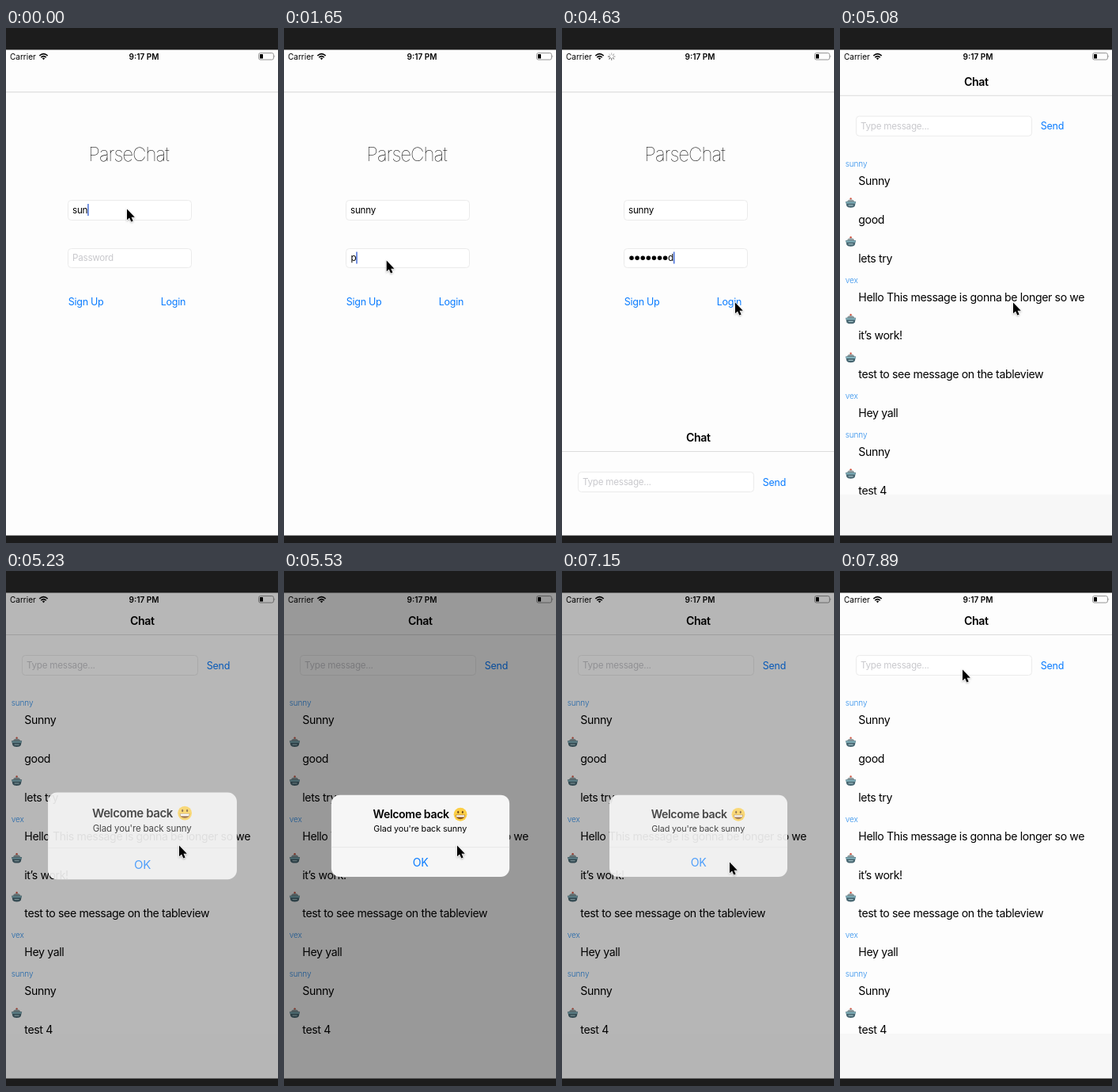
Recreate the animation shown at these times as an HTML page. Size 344 by 650 pixels, loop 8000 ms.

```html
<!DOCTYPE html>
<html lang="en">
<head>
<meta charset="utf-8">
<title>ParseChat login</title>
<style>
  html, body { margin: 0; width: 100%; height: 100%; overflow: hidden; background: #1c1c1c; }
  svg { display: block; width: 344px; height: 650px; }
  text { font-family: Inter, Roboto, sans-serif; font-size: 14.13px; letter-spacing: -.0265em; }
  .small { font-size: 11.63px; letter-spacing: -.02em; }
  .hint { fill: #c9c9cd; }
  .link { fill: #0a7cff; font-size: 12.5px; letter-spacing: -.02em; }
  .status { font-size: 10px; letter-spacing: 0; }
  .bold { font-weight: 600; }
  .user { fill: #2f8fec; font-size: 10px; font-weight: 300; letter-spacing: -.01em; }
  .field { fill: #fff; stroke: #ebebeb; }
  .mid { text-anchor: middle; }
</style>
</head>
<body>
<svg viewBox="0 0 344 650">
  <defs>
    <clipPath id="table"><rect y="154" width="344" height="430"/></clipPath>
    <g id="robot">
      <circle cy="-5.2" r="1.2" fill="#d0523f"/>
      <path d="M-4.5 -1Q-4.5 -4.2 0 -4.2T4.5 -1Z" fill="#8d9c9f"/>
      <path d="M-6.5 -1.5H6.5L5.2 4Q4 6.2 0 6.2T-5.2 4Z" fill="#466570"/>
      <path d="M-6.2 -1H6.2L5.8 1H-5.8Z" fill="#84b4be"/>
      <path d="M-3 3.3H3" stroke="#a8c6cb" stroke-width="1.2"/>
    </g>
  </defs>

  <rect y="27" width="344" height="614" fill="#fdfdfd"/>
  <path d="M0 80.8H344" stroke="#dedede" stroke-width="1.3"/>
  <text x="104.3" y="168" style="font-size:24px;font-weight:100;letter-spacing:-.04em">ParseChat</text>
  <rect class="field" x="78.5" y="217.5" width="156" height="25" rx="4"/>
  <rect class="field" x="78.5" y="278.5" width="156" height="24" rx="4"/>
  <text id="name" class="small" x="84" y="233.7"></text>
  <text id="hint" class="small hint" x="84" y="294.4">Password</text>
  <g id="dots"></g>
  <text id="letter" class="small" y="294.4"></text>
  <rect id="caret" width="1.4" height="15" fill="#3d66d6"/>
  <text class="link" x="78.7" y="349.5">Sign Up</text>
  <text id="login" class="link" x="195.7" y="349.5">Login</text>

  <g id="chat">
    <rect y="27" width="344" height="614" fill="#fdfdfd"/>
    <path d="M0 80.5H344" stroke="#dcdcdc"/>
    <text class="bold mid" x="172.3" y="68">Chat</text>
    <rect class="field" x="20.5" y="106.5" width="222" height="25" rx="4"/>
    <text class="small hint" x="26" y="123">Type message...</text>
    <text class="link" x="253.7" y="123.7">Send</text>
    <g id="rows">
      <rect id="footer" y="584" width="344" height="57" fill="#f7f7f7"/>
      <g id="list" clip-path="url(#table)"></g>
    </g>
  </g>

  <text class="status" x="5" y="39.7">Carrier</text>
  <g fill="none" stroke="#000" stroke-width="1.7">
    <path d="M42.3 35Q47.5 30.2 52.7 35M44.3 37.2Q47.5 34.2 50.7 37.2"/>
    <path d="M45.8 38.3Q47.5 36.9 49.2 38.3L47.5 40.2Z" fill="#000" stroke="none"/>
  </g>
  <g id="spinner" stroke="#444" stroke-width="1.1" stroke-linecap="round"></g>
  <text class="status bold mid" x="174.5" y="39.7">9:17 PM</text>
  <rect x="319.6" y="31.6" width="18.8" height="8.4" rx="2" fill="none" stroke="#888" stroke-width=".9"/>
  <rect x="321" y="33" width="4" height="5.6" rx=".6"/>
  <path d="M339.5 34.3Q341 35.8 339.5 37.3Z" fill="#888"/>

  <rect id="dim" y="27" width="344" height="614"/>
  <g id="alert">
    <rect id="panel" x="60" y="282.7" width="225" height="103.3" rx="11" fill="#f6f6f6"/>
    <g id="content">
      <path id="pressed" d="M60 349H285V375A11 11 0 0 1 274 386H71A11 11 0 0 1 60 375Z" fill="#dadada"/>
      <path d="M60 348.6H285" stroke="#e4e4e4" stroke-width=".8"/>
      <text class="bold" x="112.7" y="312.3">Welcome back</text>
      <circle cx="223" cy="307.3" r="8.4" fill="#fdcf45"/>
      <ellipse cx="220.2" cy="304.4" rx="1" ry="1.6" fill="#6b4415"/>
      <ellipse cx="225.8" cy="304.4" rx="1" ry="1.6" fill="#6b4415"/>
      <path d="M217 307.8H229Q228.4 313.2 223 313.2T217 307.8Z" fill="#8a5018"/>
      <path d="M217.5 308.2H228.5L227.8 310.6H218.2Z" fill="#fff"/>
      <text class="mid" x="172.2" y="329.2" style="font-size:10.8px;letter-spacing:-.01em">Glad you're back sunny</text>
      <text class="link mid" x="172.5" y="373.2" style="font-size:14.13px">OK</text>
    </g>
  </g>

  <path d="M0 0H344V27.5H0ZM0 640.5H344V650H0Z" fill="#1c1c1c"/>
  <path id="pointer" d="M0 0V13.8L3.1 11L5.3 16L7.7 15L5.5 10.2H9.8Z" stroke="#fff" stroke-width="1.2"
        paint-order="stroke" style="filter:drop-shadow(0 1px 1px #0004)"/>
</svg>

<script>
const LOOP = 8000, TICK = 148.85;   // the screen refreshes once per tick
const $ = id => document.getElementById(id);
const set = (id, attrs) => { for (const k in attrs) $(id).setAttribute(k, attrs[k]); };
const show = (id, on) => set(id, { visibility: on ? 'visible' : 'hidden' });

const robot = null, messages = [
  ['sunny', 'Sunny'], [robot, 'good'], [robot, 'lets try'],
  ['vex', 'Hello This message is gonna be longer so we'], [robot, 'it’s work!'],
  [robot, 'test to see message on the tableview'], ['vex', 'Hey yall'],
  ['sunny', 'Sunny'], [robot, 'test 4'],
];
$('list').innerHTML = messages.map(([user, text], i) => {
  const y = 167 + 48.85 * i;
  const from = user ? `<text class="user" x="6.7" y="${y + 3.3}">${user}</text>`
                    : `<use href="#robot" x="13.6" y="${y}"/>`;
  return `${from}<text x="23.3" y="${y + 26.2}">${text}</text>`;
}).join('');

$('spinner').innerHTML = Array.from({ length: 8 }, (_, i) =>
  `<path d="M0 -2.4V-4.3" transform="translate(62.7 36)rotate(${i * 45})" opacity="${.25 + i * .1}"/>`).join('');

const USER = 'sunny', PASSWORD = 'password';
const userKeys = [0, 0, 0, 1, 2], passKeys = [11, 12, 13, 15, 16, 19, 20, 22];
const typed = (keys, n) => keys.filter(k => k <= n).length;

// Critically damped spring from 0 to 1
const settle = x => {
  if (x <= 0) return 0;
  const v = 1 - (1 + x) * Math.exp(-x);
  return v > .995 ? 1 : v;
};

// Pointer moves: first tick, last tick, destination
const moves = [[3, 7, 129.7, 293.5], [22, 27, 219, 346.5], [39, 44, 212, 367.5], [48, 53, 155, 124.5]];
function pointerAt(n) {
  let x = 153, y = 228.5;
  for (const [a, b, toX, toY] of moves) {
    const u = Math.min(1, Math.max(0, (n - a) / (b - a))), e = u * u * (3 - 2 * u);
    x += (toX - x) * e;
    y += (toY - y) * e;
  }
  return [x, y];
}

function drawFields(n) {
  $('name').textContent = USER.slice(0, typed(userKeys, n));
  const count = typed(passKeys, n), hidden = Math.max(0, count - 1), x = 84.4 + 7.1 * hidden;
  show('hint', !count);
  $('dots').innerHTML = Array.from({ length: hidden }, (_, i) =>
    `<circle cx="${88 + 7.1 * i}" cy="290.2" r="2.75"/>`).join('');
  $('letter').textContent = count ? PASSWORD[hidden] : '';
  set('letter', { x });
  const inPassword = n >= 8;
  const end = inPassword ? x + $('letter').getComputedTextLength()
                         : 84 + $('name').getComputedTextLength();
  set('caret', { x: end, y: inPassword ? 282.5 : 222 });
}

function draw(n) {
  drawFields(n);
  set('login', { opacity: n === 28 ? .3 : 1 });
  show('spinner', n >= 29 && n < 34);
  set('spinner', { transform: `rotate(${n * 45} 62.7 36)` });

  set('chat', { transform: `translate(0 ${614 * (1 - settle((n - 30.5) * 1.98))})` });
  show('rows', n >= 33);

  const enter = settle((n - 34) * 2.4), alpha = enter * (1 - settle((n - 47.4) * 1.8));
  set('dim', { opacity: .4 * alpha });
  set('footer', { opacity: 1 - alpha });
  set('panel', { opacity: 1 - (1 - alpha) ** 2 });
  set('content', { opacity: alpha });
  set('alert', { transform: `translate(172.5 334.5)scale(${1.2 - .2 * enter})translate(-172.5 -334.5)` });
  show('pressed', n >= 45 && n < 48);
  set('pointer', { transform: `translate(${pointerAt(n)})` });
}

function frame() {
  draw(Math.floor(performance.now() % LOOP / TICK));
  requestAnimationFrame(frame);
}
frame();
</script>
</body>
</html>
```
